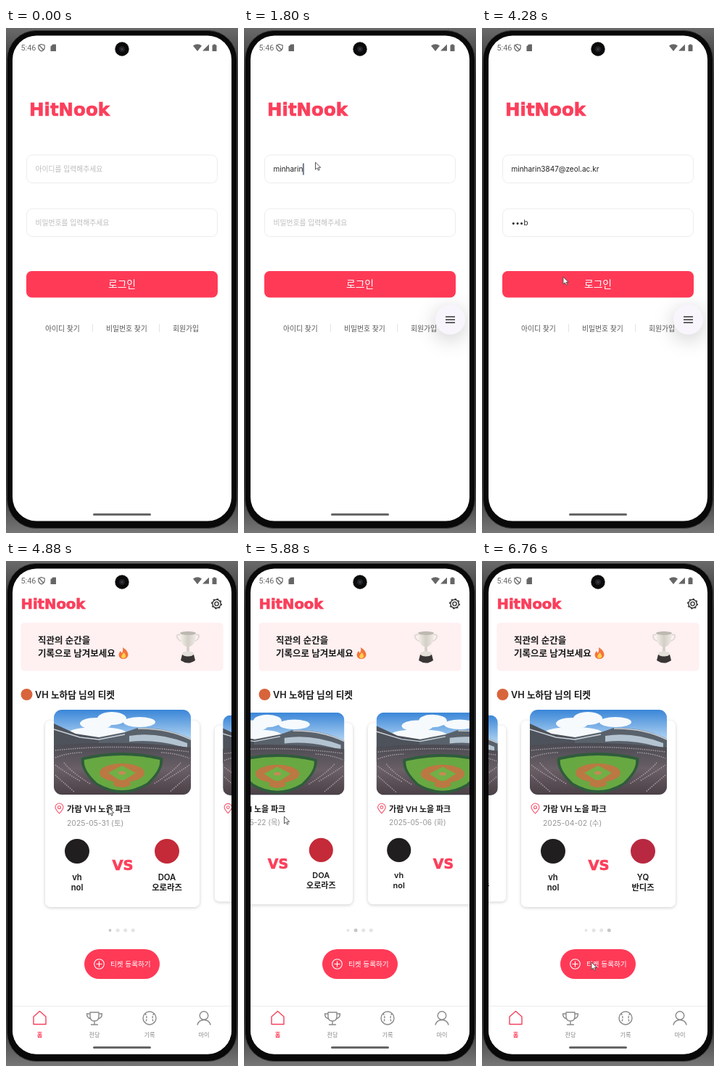
These frames come from a looping animation (320 by 696 pixels, 6.8 s). An HTML page:

```html
<!DOCTYPE html>
<html lang="ko">
<head>
<meta charset="utf-8">
<title>HitNook</title>
<style>
  html, body { margin: 0; width: 100%; height: 100%; overflow: hidden; background: #444; }
  svg { display: block; width: 320px; height: 696px; }
  text { font-family: "Noto Sans CJK KR", "Noto Sans CJK", "Noto Sans", sans-serif; font-size: 9.8px; fill: #555; white-space: pre; }
  .latin { font-family: Inter, "Noto Sans CJK KR", sans-serif; font-size: 10px; fill: #222; }
  .brand { font-family: "DejaVu Sans", sans-serif; font-weight: 700; fill: #fb3f5b; stroke: #fb3f5b; stroke-width: .7; }
  .hint { fill: #bcbcbc; }
  .mid { text-anchor: middle; }
  .bold { font-family: Inter, "Noto Sans CJK KR", sans-serif; font-weight: 600; fill: #1a1a1a; }
  .name { font-size: 11.3px; }
  .field { fill: #fff; stroke: #ececec; }
  .line { fill: none; stroke: #8a8a8a; stroke-width: 1.4; stroke-linecap: round; stroke-linejoin: round; }
  .tab { font-size: 8.2px; fill: #888; text-anchor: middle; }
  .shade { filter: drop-shadow(0 1.5px 2px #0003); }
  .float { filter: drop-shadow(0 6px 14px #0003); }
</style>
</head>
<body>
<svg viewBox="0 0 320 696">
  <defs>
    <clipPath id="screen"><rect x="9" y="10.5" width="302" height="669" rx="33"/></clipPath>
    <clipPath id="photoClip"><rect width="189" height="117" rx="11"/></clipPath>
    <linearGradient id="sky" x2="0" y2="1">
      <stop stop-color="#3a86d8"/><stop offset=".4" stop-color="#c4e0f6"/>
    </linearGradient>
    <linearGradient id="stands" x2="0" y2="1">
      <stop stop-color="#4a4a52"/><stop offset=".5" stop-color="#6a5f66"/><stop offset="1" stop-color="#4a4046"/>
    </linearGradient>
    <linearGradient id="silver">
      <stop stop-color="#f4f1ea"/><stop offset=".5" stop-color="#d3cfc7"/><stop offset="1" stop-color="#efebe5"/>
    </linearGradient>
    <linearGradient id="metal" x2="0" y2="1">
      <stop stop-color="#6a6a6a"/><stop offset=".1" stop-color="#2c2c2c"/>
      <stop offset=".9" stop-color="#2c2c2c"/><stop offset="1" stop-color="#777"/>
    </linearGradient>
    <g id="photo" clip-path="url(#photoClip)">
      <rect width="189" height="117" fill="url(#sky)"/>
      <g fill="#f6fafd">
        <ellipse cx="58" cy="19" rx="22" ry="8"/><ellipse cx="80" cy="12" rx="20" ry="9"/>
        <ellipse cx="118" cy="17" rx="22" ry="7"/><ellipse cx="60" cy="32" rx="40" ry="8"/>
      </g>
      <path d="M0 19 L30 33 L62 38 V70 H0Z" fill="#4d525b"/>
      <path d="M62 38 L98 31 L116 25 Q156 24 189 40 V70 H62Z" fill="#59616b"/>
      <path d="M104 36 Q142 30 184 46 V53 Q142 40 104 44Z" fill="#b4c3d0"/>
      <path d="M0 27 L36 38 L62 41 L98 34 M116 26 Q156 25 189 41" fill="none" stroke="#cbd2d8" stroke-width="1.4"/>
      <path d="M0 49 Q94 41 189 52 V117 H0Z" fill="url(#stands)"/>
      <g fill="none" stroke="#a79ca3" stroke-width="1.5" stroke-dasharray="1.5 1.5">
        <path d="M2 56 Q94 46 187 58 M2 66 Q20 59 40 59 M148 59 Q170 60 187 67"/>
        <path d="M2 76 Q12 84 36 98 M187 76 Q176 84 152 98"/>
        <path d="M2 90 Q14 101 28 113 M187 90 Q174 101 160 113"/>
        <path d="M14 73 Q24 86 50 102 M175 73 Q164 86 138 102"/>
      </g>
      <path d="M38 66 Q94 52 150 66 Q153 82 131 103 Q94 127 57 103 Q35 82 38 66Z" fill="#2f5c3c"/>
      <path d="M42 69 Q94 57 146 69 Q148 83 128 101 Q94 121 60 101 Q40 83 42 69Z" fill="#68a842"/>
      <ellipse cx="94" cy="87" rx="31" ry="13" fill="#bb7842"/>
      <path d="M94 77 L113 87 L94 99 L75 87Z" fill="#70b047"/>
      <ellipse cx="94" cy="87" rx="5" ry="2.5" fill="#c88955"/>
      <ellipse cx="94" cy="102" rx="12" ry="5" fill="#bb7842"/>
    </g>
  </defs>

  <rect width="320" height="696" fill="url(#metal)"/>
  <rect x="1.5" y="3.5" width="317" height="686" rx="40" fill="#090909" stroke="#3d3d3d"/>

  <g clip-path="url(#screen)">
    <rect width="320" height="696" fill="#fff"/>

    <g id="login">
      <text class="brand" x="32" y="121" style="font-size:24.5px">HitNook</text>
      <rect class="field" x="28.5" y="175" width="263" height="38.5" rx="8"/>
      <rect class="field" x="28.5" y="249" width="263" height="38.5" rx="8"/>
      <text class="hint" id="idHint" x="40.5" y="198">아이디를 입력해주세요</text>
      <text class="hint" id="pwHint" x="40.5" y="272">비밀번호를 입력해주세요</text>
      <text class="latin" id="idText" x="40.5" y="198"></text>
      <text class="latin" id="pwText" x="40.5" y="272"></text>
      <g id="caret"><rect width="2" height="16" fill="#b9d3f5"/><rect width="1" height="16" fill="#333"/></g>
      <rect x="28" y="335" width="264" height="36.5" rx="7.5" fill="#ff3a57"/>
      <text class="mid" x="160" y="358" style="font-size:13.8px;font-weight:500;fill:#fff">로그인</text>
      <text x="54" y="417.5">아이디 찾기</text>
      <text x="138" y="417.5">비밀번호 찾기</text>
      <text x="230" y="417.5">회원가입</text>
      <path d="M119.5 408V419M211.5 408V419" stroke="#e4e4e4"/>
      <g id="menu">
        <circle class="float" cx="284.5" cy="402" r="20.5" fill="#f8f5fc"/>
        <path d="M278 398H291M278 402H291M278 406H291" stroke="#333" stroke-width="1.6"/>
      </g>
    </g>

    <g id="home">
      <text class="brand" x="20.5" y="66" style="font-size:19.6px">HitNook</text>
      <g class="line" style="stroke:#333">
        <circle cx="290.5" cy="59" r="2.6"/>
        <circle cx="290.5" cy="59" r="5.7"/>
        <circle cx="290.5" cy="59" r="6.8" stroke-dasharray="2.3 3.04" stroke-linecap="butt"/>
      </g>
      <rect x="20.5" y="85" width="279" height="66.5" rx="5" fill="#fff0f1"/>
      <text class="bold" x="44" y="114" style="font-size:12.5px">직관의 순간을</text>
      <text class="bold" x="44" y="132" style="font-size:12.5px">기록으로 남겨보세요</text>
      <path d="M161 119Q169 124 168.5 130Q167 135 162 135Q156 135 155.5 129Q156 126 158 124L159.5 127Q162 124 161 119Z" fill="#f5743a"/>
      <path d="M162.5 126Q166 130 165 132.5Q162 136 159 132.5Q159 130 162.5 126Z" fill="#ffd052"/>
      <path d="M241 102Q235 100 236 105Q238 110 244 111M261 102Q267 100 266 105Q264 110 258 111" fill="none" stroke="#dcd8d1" stroke-width="1.8"/>
      <path d="M240 99H262Q262 116 253 118V126H249V118Q240 116 240 99Z" fill="url(#silver)"/>
      <ellipse cx="251" cy="99.5" rx="11" ry="2.4" fill="#bdb8b0"/>
      <path d="M243 129H259L261 137Q251 144 241 137Z" fill="#3a3535"/>
      <ellipse cx="251" cy="128" rx="8" ry="3.4" fill="#e3dfd9"/>
      <circle cx="28.5" cy="184" r="8" fill="#d8643c"/>
      <text class="bold" x="40" y="188.5" style="font-size:12.7px">VH 노하담 님의 티켓</text>
      <g id="cards"></g>
      <g id="dots"></g>
      <rect x="108" y="535" width="104" height="41" rx="20.5" fill="#ff3a57"/>
      <g class="line" style="stroke:#fff;stroke-width:1.1">
        <circle cx="128.5" cy="555.5" r="6.8"/><path d="M125 555.5H132M128.5 552V559"/>
      </g>
      <text x="144" y="559" style="font-size:9.6px;font-weight:500;fill:#fff">티켓 등록하기</text>
      <rect x="0" y="613" width="320" height="70" fill="#fff"/>
      <path d="M0 613.5H320" stroke="#ececec"/>
      <g class="line">
        <path d="M38 638.5V628L46.5 620.5L55 628V638.5Z" style="stroke:#f5405c"/>
        <path d="M116 622H128V628Q128 634 122 634Q116 634 116 628ZM116 624H111.5Q111.5 630 117 631M128 624H132.5Q132.5 630 127 631M122 634V639M117.5 639H126.5"/>
        <circle cx="198" cy="630" r="9"/>
        <path d="M192 623.5Q196 630 192 636.5M204 623.5Q200 630 204 636.5" stroke-dasharray="2 2.4"/>
        <circle cx="273" cy="626.5" r="5.8"/><path d="M264 639Q266 632.5 273 632.5Q280 632.5 282 639"/>
      </g>
      <text class="tab" x="46.5" y="656" style="fill:#ff3a57;font-weight:600">홈</text>
      <text class="tab" x="122" y="656">전당</text>
      <text class="tab" x="198" y="656">기록</text>
      <text class="tab" x="273" y="656">마이</text>
    </g>

    <text x="20.5" y="31" style="font-family:Roboto,sans-serif;font-size:10.8px;fill:#6b6b6b">5:46</text>
    <path d="M49 22.5L53.2 24V27.5Q52.5 30.5 49 32Q45.5 30.5 44.8 27.5V24ZM46 24L52 30.5" fill="none" stroke="#6b6b6b" stroke-width="1.2"/>
    <g fill="#666">
      <path d="M64.5 22.5H69V32H61.5V25.5Z"/>
      <path d="M258 24.5Q264 20 270 24.5L264 32Z"/>
      <path d="M280 22.5V31.5H271Z"/>
      <path d="M286 22.5H289V23.5H290.5V32H284.5V23.5H286Z"/>
      <rect x="120" y="669" width="80" height="3" rx="1.5"/>
    </g>
    <circle cx="160" cy="29" r="9.7" fill="#0a0a0a"/>
    <circle cx="160" cy="29" r="4" fill="#202226"/>
    <circle cx="160" cy="29" r="1.5" fill="#3a3f46"/>
  </g>
  <path id="mouse" d="M0 0V10L2.4 7.9L4 11.3L5.6 10.5L4.1 7.3H7.2Z" fill="#fff" stroke="#444" stroke-width=".9"/>
</svg>

<script>
const LOOP = 6800, STEP = 40, HOME_AT = 4440;
const $ = id => document.getElementById(id);
const show = (el, on) => { el.style.display = on ? '' : 'none'; };

const email = 'minharin3847@zeol.ac.kr';
const emailTimes = [
  ...Array.from({ length: 8 }, (_, i) => 1520 + i * 40),
  1880, 1960, 2040, 2120, 2320,
  2560, 2640, 2720, 2800,
  3000, 3040, 3080, 3120, 3160, 3200
];
const password = 'wdnb';
const passTimes = [3720, 3880, 3960, 4040];

// [time, x, y]
const mousePath = [
  [80, 322, 372], [420, 185, 245], [700, 98.5, 185], [3240, 98.5, 185],
  [3480, 106, 264], [4060, 106, 264], [4240, 112, 343], [4720, 112, 343],
  [5120, 186, 335], [5240, 186, 335], [5400, 66, 337], [5480, 62, 340],
  [5640, 205, 350], [5720, 205, 350], [5880, 55.5, 352], [5960, 53, 353],
  [6160, 212, 344], [6260, 212, 344], [6400, 70, 345], [6460, 66, 348],
  [6720, 151, 553]
];
// [time, card position]
const swipe = [
  [5240, 0], [5400, .496], [5560, 1], [5720, 1], [5880, 1.5],
  [6040, 2], [6260, 2], [6400, 2.5], [6560, 3]
];

const games = [
  ['2025-05-31 (토)', 'DOA', '오로라즈', '#c42a38'],
  ['2025-05-22 (목)', 'DOA', '오로라즈', '#c42a38'],
  ['2025-05-06 (화)', 'ZD', '구름새즈', '#2d5687'],
  ['2025-04-02 (수)', 'YQ', '반디즈', '#b92841']
];

const team = (x, color, top, bottom) => `
  <circle cx="${x}" cy="400" r="17" fill="${color}"/>
  <text class="bold name mid" x="${x}" y="440">${top}</text>
  <text class="bold name mid" x="${x}" y="454">${bottom}</text>`;

$('cards').innerHTML = games.map(([date, top, bottom, color]) => `<g>
  <rect class="shade" x="54" y="220" width="213" height="257" rx="7" fill="#fff"/>
  <use href="#photo" x="66" y="205"/>
  <g class="line" style="stroke:#f5506a;stroke-width:1.1">
    <path d="M73.5 348Q68 342 68 339.5A5.5 5.5 0 0 1 79 339.5Q79 342 73.5 348Z"/>
    <circle cx="73.5" cy="339.5" r="2"/>
  </g>
  <text class="bold name" x="84" y="346">가람 VH 노을 파크</text>
  <text class="latin" x="84" y="364.5" style="font-size:10.4px;fill:#969696">${date}</text>
  ${team(98, '#211e20', 'vh', 'nol')}
  ${team(222, color, top, bottom)}
  <text class="brand mid" x="161" y="426" style="font-size:19.5px">VS</text>
</g>`).join('');
$('dots').innerHTML = games.map((_, i) =>
  `<circle cx="${143.5 + i * 10.6}" cy="509" r="${i ? 2.5 : 1.9}"/>`).join('');

const cards = [...$('cards').children], dots = [...$('dots').children];

function sample(keys, t) {
  const next = keys.findIndex(k => k[0] > t);
  if (next < 0) return keys[keys.length - 1].slice(1);
  if (next === 0) return keys[0].slice(1);
  const a = keys[next - 1], b = keys[next], u = (t - a[0]) / (b[0] - a[0]);
  return a.slice(1).map((v, i) => v + (b[i + 1] - v) * u);
}

const typed = (times, t) => times.filter(at => at <= t).length;

function drawLogin(t) {
  const n = typed(emailTimes, t), m = typed(passTimes, t);
  $('idText').textContent = email.slice(0, n);
  $('pwText').textContent = m ? '•'.repeat(m - 1) + password[m - 1] : '';
  show($('idHint'), !n);
  show($('pwHint'), !m);
  show($('menu'), t >= 800);
  $('menu').style.opacity = Math.min(1, (t - 760) / 120);
  const inPass = t >= 3480;
  show($('caret'), t >= 720 && t < 4080);
  const width = $(inPass ? 'pwText' : 'idText').getComputedTextLength();
  $('caret').setAttribute('transform', `translate(${40.5 + width} ${inPass ? 260.5 : 186.5})`);
}

function drawHome(t) {
  const [p] = sample(swipe, t), active = Math.floor(p + .49);
  cards.forEach((card, i) => {
    const d = i - p, s = 1 - .055 * Math.min(1, Math.abs(d));
    card.setAttribute('transform', `translate(${160.5 + 228 * d} 341) scale(${s}) translate(-160.5 -341)`);
  });
  dots.forEach((dot, i) => dot.setAttribute('fill', i === active ? '#c6c6c6' : '#e4e4e4'));
}

function draw(t) {
  const atHome = t >= HOME_AT;
  show($('login'), !atHome);
  show($('home'), atHome);
  (atHome ? drawHome : drawLogin)(t);
  const [x, y] = sample(mousePath, t);
  show($('mouse'), t >= 80);
  $('mouse').setAttribute('transform', `translate(${x} ${y})`);
}

const start = performance.now();
function tick() {
  const t = (performance.now() - start) % LOOP;
  draw(Math.floor(t / STEP) * STEP);
  requestAnimationFrame(tick);
}
tick();
</script>
</body>
</html>
```
